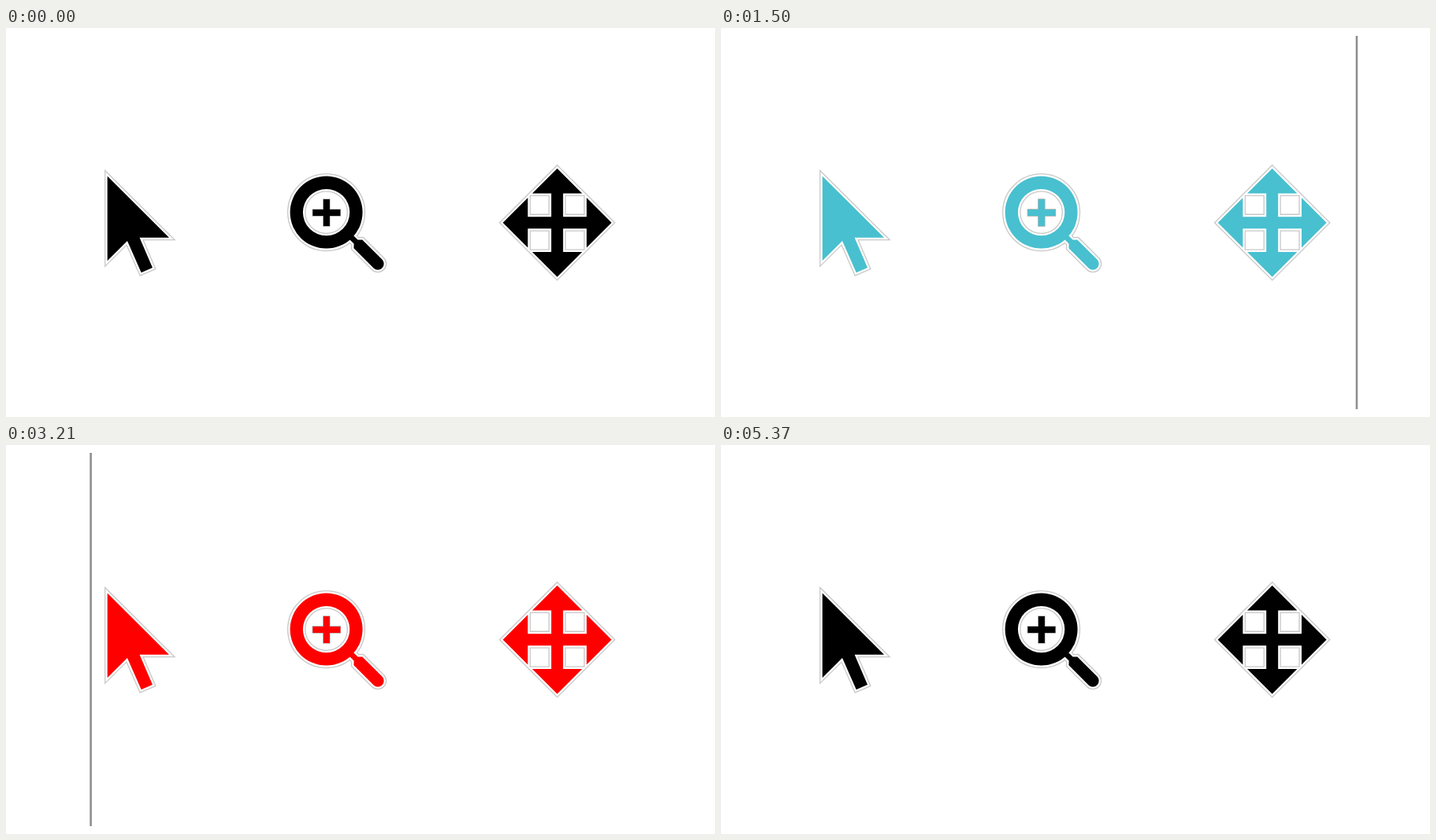
An HTML page for the animation above (5400 ms loop, 900 by 495 pixels).

```html
<!DOCTYPE html>
<html lang="en">
<head>
<meta charset="utf-8">
<title>Cursor colour wipe</title>
<style>
  html, body { margin: 0; width: 100%; height: 100%; overflow: hidden; background: #fff; }
  svg { display: block; width: 100%; height: 100%; }
</style>
</head>
<body>
<svg viewBox="0 0 900 495">
  <defs>
    <g id="icons">
      <path d="M128.7 188.5V296.2L154 271L171.7 311.2L186 305L169.6 266.7H207Z"/>
      <g transform="translate(406.6 234.6) rotate(45)">
        <path fill-rule="evenodd" d="M46 0A46 46 0 1 1 -46 0A46 46 0 1 1 46 0ZM29.7 0A29.7 29.7 0 1 0 -29.7 0A29.7 29.7 0 1 0 29.7 0Z"/>
        <path d="M44 -3.5H53L57 -7.7H92.5A7.7 7.7 0 0 1 92.5 7.7H57L53 3.5H44Z"/>
      </g>
      <path transform="translate(699.7 247.7)" d="M0 -69L31.7 -37.3H7.5V-7.5H37.3V-31.7L69 0L37.3 31.7V7.5H7.5V37.3H31.7L0 69L-31.7 37.3H-7.5V7.5H-37.3V31.7L-69 0L-37.3 -31.7V-7.5H-7.5V-37.3H-31.7Z"/>
    </g>
    <path id="plus" transform="translate(406.9 235)" d="M-4 -17H4V-4H17.5V4H4V17H-4V4H-17.5V-4H-4Z"/>
    <g id="fills"><use href="#icons"/><use href="#plus"/></g>
    <clipPath id="leftClip"><rect id="leftArea" height="495"/></clipPath>
    <clipPath id="rightClip"><rect id="rightArea" width="900" height="495"/></clipPath>
  </defs>
  <use href="#icons" fill="none" stroke="#c8c8c8" stroke-width="7.2"/>
  <use href="#icons" fill="#fff" stroke="#fff" stroke-width="4.6"/>
  <use href="#plus" fill="none" stroke="#aaa" stroke-width="1.4"/>
  <g clip-path="url(#leftClip)"><use id="left" href="#fills"/></g>
  <g clip-path="url(#rightClip)"><use id="right" href="#fills"/></g>
  <rect id="line" y="10" width="2.6" height="475" fill="#8f8f8f"/>
</svg>
<script>
const LOOP = 5400, WIPE = 900;
const MIN_X = 89.5, MAX_X = 807, LINE_WIDTH = 2.6;
const TEAL = '#48c0cf', RED = '#ff0000', BLACK = '#000';

const wipes = [
  { start: 600, from: MIN_X, to: MAX_X, x1: 1 / 3, left: TEAL, right: BLACK },
  { start: 2400, from: MAX_X, to: MIN_X, x1: 1 / 6, left: TEAL, right: RED },
  { start: 4200, from: MIN_X, to: MAX_X, x1: 1 / 3, left: BLACK, right: RED }
];

const el = id => document.getElementById(id);
const clamp = v => Math.max(0, Math.min(1, v));

// cubic-bezier(x1, 0, 2/3, 1), solved by bisection
function ease(x, x1) {
  let low = 0, high = 1;
  for (let i = 0; i < 24; i++) {
    const s = (low + high) / 2, r = 1 - s;
    if (3 * s * r * r * x1 + 2 * s * s * r + s * s * s < x) low = s;
    else high = s;
  }
  return low * low * (3 - 2 * low);
}

function draw(now) {
  const t = now % LOOP;
  const wipe = wipes.findLast(w => t >= w.start) || wipes[0];
  const progress = ease(clamp((t - wipe.start) / WIPE), wipe.x1);
  const x = wipe.from + (wipe.to - wipe.from) * progress;

  el('leftArea').setAttribute('width', x);
  el('rightArea').setAttribute('x', x);
  el('left').setAttribute('fill', wipe.left);
  el('right').setAttribute('fill', wipe.right);
  el('line').setAttribute('x', x - LINE_WIDTH / 2);
  el('line').setAttribute('opacity', clamp((t - 70) / 200) * clamp((5310 - t) / 200));
  requestAnimationFrame(draw);
}
draw(performance.now());
</script>
</body>
</html>
```
